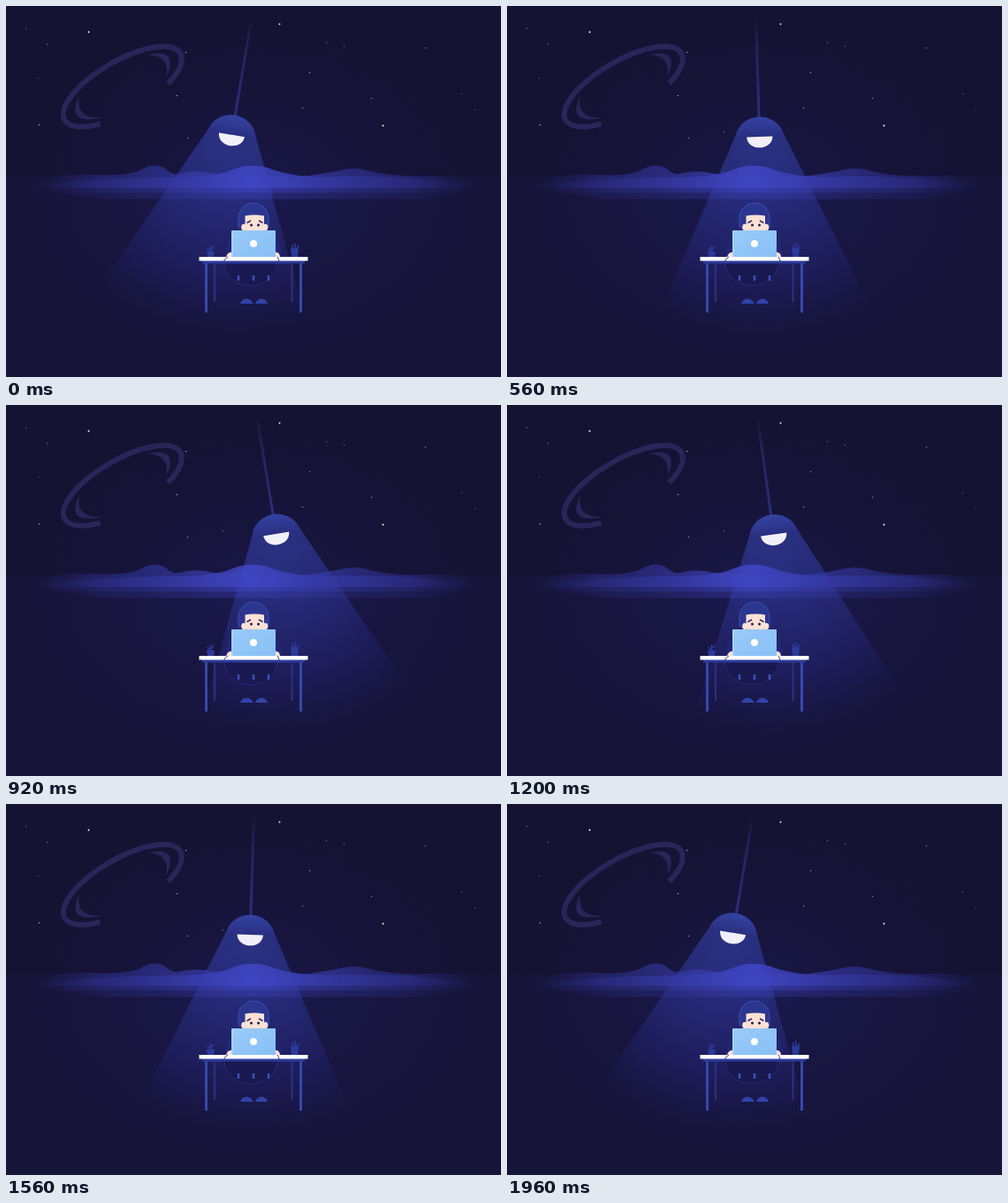
Animation, 560 px wide and 420 px high, one loop 2000 ms. Source, as an HTML page:

```html
<!DOCTYPE html>
<html lang="en">
<head>
<meta charset="utf-8">
<title>Night desk</title>
<style>
  html, body { margin: 0; width: 100%; height: 100%; overflow: hidden; background: #161337; }
  svg { display: block; width: 100vw; height: 100vh; }
</style>
</head>
<body>
<svg viewBox="0 0 560 420">
  <defs>
    <radialGradient id="glow">
      <stop offset="0" stop-color="#22227a" stop-opacity=".3"/>
      <stop offset="1" stop-color="#1c1a5a" stop-opacity="0"/>
    </radialGradient>
    <radialGradient id="beam" gradientUnits="userSpaceOnUse" cx="0" cy="150" r="226">
      <stop offset="0" stop-color="#3644ac" stop-opacity=".64"/>
      <stop offset=".35" stop-color="#323ca4" stop-opacity=".52"/>
      <stop offset=".7" stop-color="#2c309a" stop-opacity=".3"/>
      <stop offset="1" stop-color="#28288a" stop-opacity="0"/>
    </radialGradient>
    <linearGradient id="shade" x1="0" y1="0" x2="0" y2="1">
      <stop offset="0" stop-color="#3443a2"/>
      <stop offset="1" stop-color="#282e7d"/>
    </linearGradient>
    <linearGradient id="cord" gradientUnits="userSpaceOnUse" x1="0" y1="16" x2="0" y2="132">
      <stop offset="0" stop-color="#26235c" stop-opacity="0"/>
      <stop offset=".3" stop-color="#24215a"/>
      <stop offset="1" stop-color="#2a2f7c"/>
    </linearGradient>
    <linearGradient id="ridge" gradientUnits="userSpaceOnUse" x1="32" y1="0" x2="532" y2="0">
      <stop offset="0" stop-color="#25246c" stop-opacity="0"/>
      <stop offset=".15" stop-color="#2a2b80" stop-opacity=".8"/>
      <stop offset=".49" stop-color="#4046c4"/>
      <stop offset=".85" stop-color="#2a2b80" stop-opacity=".8"/>
      <stop offset="1" stop-color="#25246c" stop-opacity="0"/>
    </linearGradient>
    <linearGradient id="screen" x1="0" y1="0" x2="1" y2="1">
      <stop offset="0" stop-color="#9acbfa"/>
      <stop offset="1" stop-color="#88bff5"/>
    </linearGradient>
  </defs>

  <rect width="560" height="420" fill="#151232"/>
  <rect y="193" width="560" height="227" fill="#17143a"/>
  <ellipse cx="280" cy="210" rx="270" ry="200" fill="url(#glow)"/>
  <g id="stars" fill="#fff"></g>

  <!-- planet ring -->
  <g transform="translate(132 91) rotate(-30)" fill="#2a2559">
    <path d="M-43 24A75.500 29 0 1 1 46 23" fill="none" stroke="#2a2559" stroke-width="6"/>
    <path d="M42-17Q78-6 48 16Q64-4 42-17Z"/>
    <path d="M-48-15Q-80 6-36 20Q-66 6-48-15Z"/>
  </g>

  <g class="swing">
    <path d="M0 16V134" stroke="url(#cord)" stroke-width="3"/>
    <path d="M-27 150H27L131 374H-131Z" fill="url(#beam)"/>
  </g>

  <!-- hills and their reflection -->
  <g fill="url(#ridge)">
    <path opacity=".75" d="M32 206V199Q60 189 100 191Q130 193 150 187C162 179 174 178 184 187Q190 192 200 189Q215 185 236 190L335 193Q358 190 374 187C388 183 400 183 412 187Q440 194 480 192T532 201V206Z"/>
    <path opacity=".9" d="M32 206V202Q130 194 200 194Q236 193 254 186C270 179 288 179 304 186Q335 196 385 193Q450 192 532 202V206Z"/>
    <path opacity=".68" d="M32 206H532L510 211.500H60Z"/>
    <path opacity=".36" d="M60 211.500H510L480 218.500H110Z"/>
  </g>

  <g class="swing">
    <path d="M-27.500 155C-27.500 142-15 130.500 0 130.500S27.500 142 27.500 155Z" fill="url(#shade)"/>
    <path d="M-14.700 153H14.700C14 169.500-14 169.500-14.700 153Z" fill="#f1f0f8"/>
  </g>

  <!-- chair, feet and far legs -->
  <path d="M247 291C249 325 304 325 307 291" fill="#1a1850" stroke="#272b76"/>
  <path d="M263 305v6M280 305v6M297 305v6" stroke="#3c50ba" stroke-width="2.500"/>
  <path d="M265 337q2-5.500 7-5.500t8 5.500zM282 337q2-5.500 7-5.500t7 5.500z" fill="#3143a8"/>
  <path d="M236 292v43M323.500 292v43" stroke="#29317f" stroke-width="2.200"/>

  <!-- worker -->
  <path d="M248 285Q247 263 264 260H297Q313 262 312 285Z" fill="#222573"/>
  <path d="M263 252V240A17 17 0 0 1 297 240V252Z" fill="#2b368f"/>
  <path d="M263 250V240A17 17 0 0 1 297 240V250" fill="none" stroke="#3a50ad"/>
  <g fill="#fde1d5">
    <path d="M270.500 237.500Q281 235.500 292 237.500V258H270.500Z"/>
    <ellipse cx="269" cy="250.500" rx="2.800" ry="3.800"/>
    <ellipse cx="293.500" cy="250.500" rx="2.800" ry="3.800"/>
    <path d="M249 284.500q1-6 7-6v6zM304 284.500v-6q6 0 6 6z"/>
  </g>
  <g fill="#211c4b">
    <circle cx="277.500" cy="248" r="1.500"/>
    <circle cx="285.500" cy="248" r="1.500"/>
  </g>
  <path d="M272.500 245.500l4.500-2.500M286 243l4.500 2.500" stroke="#2b2b70" stroke-width="1.500"/>
  <rect x="255" y="254" width="50" height="31" rx="1" fill="url(#screen)"/>
  <path d="M256 255v29" stroke="#b4dcfb"/>
  <circle cx="280" cy="269" r="4" fill="#fff"/>

  <!-- pots -->
  <g fill="#2c3b9a" stroke="#2c3b9a">
    <path d="M227.500 278h8l-1 6h-6z"/>
    <path d="M231.500 278v-7M231.500 277l-4-3M231.500 276l4-4" fill="none" stroke-width="1.500"/>
    <path d="M322.500 274.500h8l-1 9.500h-6z"/>
    <path d="M324.500 275l-1-5M327 275v-7M329 275l2-4" fill="none" stroke-width="1.500"/>
  </g>

  <!-- desk -->
  <path d="M226.500 290v57M333.500 290v57" stroke="#3548ac" stroke-width="3"/>
  <rect x="222" y="288" width="116" height="3.500" fill="#2c3c9b"/>
  <rect x="218.500" y="284" width="123" height="4.500" fill="#fff"/>
  <path d="M251 284q-4 2-5 6M307 284q2 2 2 6" fill="none" stroke="#3b3b83"/>
</svg>
<script>
  // x, y, brightness
  const stars = [
    [93, 29, 1], [309, 20, .9], [426, 135, 1], [37, 134, .6], [203, 52, .6],
    [193, 101, .6], [335, 115, .5], [343, 75, .5], [413, 104, .5], [205, 149, .5],
    [474, 47, .5], [382, 45, .4], [245, 142, .4], [362, 41, .4], [22, 25, .4],
    [46, 43, .4], [36, 81, .3], [515, 99, .3], [530, 117, .3]
  ];
  document.getElementById('stars').innerHTML = stars.map(([x, y, b]) =>
    `<circle cx="${x + .5}" cy="${y + .5}" r="${.5 + b * .5}" opacity="${b}"/>`).join('');

  const swings = document.querySelectorAll('.swing');
  const LOOP = 2000, STEP = 40, REACH = 9.6;

  function draw() {
    const t = Math.floor(performance.now() % LOOP / STEP) * STEP;
    const angle = REACH * Math.cos(2 * Math.PI * t / LOOP);
    for (const s of swings) s.setAttribute('transform', `translate(281 -5) rotate(${angle})`);
    requestAnimationFrame(draw);
  }
  draw();
</script>
</body>
</html>
```
